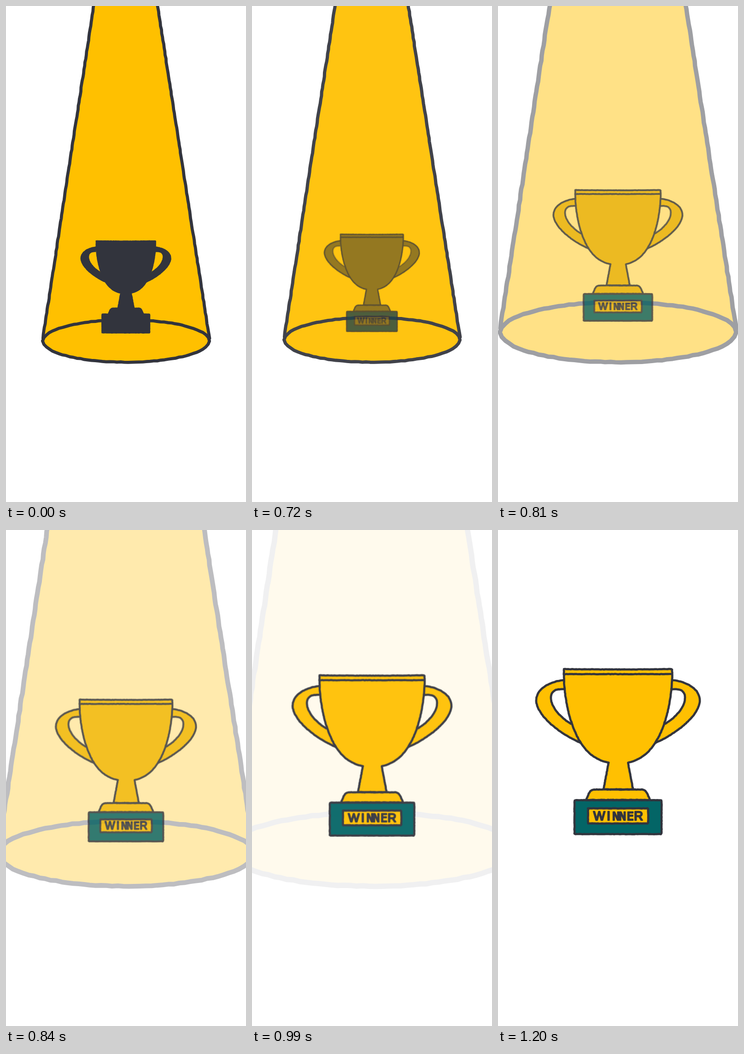
Write an HTML page that moves like this. It is 521 px wide and 1075 px high and loops after 1.23 s.

```html
<!DOCTYPE html>
<html lang="en">
<head>
<meta charset="utf-8">
<title>Trophy reveal</title>
<style>
  html, body { margin: 0; width: 100%; height: 100%; overflow: hidden; background: #fff; }
  svg { display: block; width: 100%; height: 100%; }
  path { stroke-linecap: round; stroke-linejoin: round; }
  text { font: 27px "Liberation Sans", Arial, sans-serif; }
  .narrow { font: 26px "Noto Sans Mono", monospace; }
</style>
</head>
<body>
<svg id="stage" viewBox="0 0 521 1075" xmlns="http://www.w3.org/2000/svg">
  <g id="spot"></g>
  <g id="shade"></g>
  <g id="trophy"></g>
</svg>
<script>
const INK = '#32343d', GOLD = '#ffc000', TEAL = '#036566';
const LOOP = 1230, STEP = 30, START = 602, LENGTH = 610;
const CENTER = 260.5, FLOOR = 772;
const byId = id => document.getElementById(id);
const spot = byId('spot'), shade = byId('shade'), trophy = byId('trophy');

let seed = 7;
const random = () => (seed = seed * 16807 % 2147483647) / 2147483647;

function add(parent, tag, attrs) {
  const el = document.createElementNS('http://www.w3.org/2000/svg', tag);
  for (const key in attrs) el.setAttribute(key, attrs[key]);
  return parent.appendChild(el);
}

// Resamples a path with small random offsets for a hand-drawn edge.
function rough(d, gap, amount) {
  const probe = document.createElementNS('http://www.w3.org/2000/svg', 'path');
  probe.setAttribute('d', d);
  const total = probe.getTotalLength();
  const count = Math.ceil(total / gap);
  const points = [];
  for (let i = 0; i <= count; i++) {
    const q = probe.getPointAtLength(total * i / count);
    const x = q.x + (random() * 2 - 1) * amount;
    const y = q.y + (random() * 2 - 1) * amount;
    points.push(x.toFixed(2) + ' ' + y.toFixed(2));
  }
  return 'M' + points.join('L') + (/z$/i.test(d) ? 'Z' : '');
}

function draw(parent, d, fill, stroke, width, gap = 3, amount = 0.35) {
  add(parent, 'path', { d: rough(d, gap, amount), fill, stroke, 'stroke-width': width });
}

const outer = 'M143 325C110 329 83 345 83 369C83 400 130 440 181 462';
const inner = 'M143 345H133C121 346 115 353 115 363C115 385 137 407 158 420';
const handle = outer + 'L158 420C137 407 115 385 115 363C115 353 121 346 133 345H143Z';
const cup = 'M143 301.3Q260.5 303 378 301.3V318C377 360 368 415 345 455C328 485 305 500 282 504' +
  'L293 562H229L240 504C216 500 193 485 176 455C153 415 144 360 143 318Z';
const dome = 'M191 585C197 573 198 562 211 562.5H311C323 562 324 573 330 585Z';
const base = 'M169 585.5H353Q355 585.5 355 588V659H166V588Q166 585.5 169 585.5Z';

function buildSpot() {
  draw(spot, 'M191 -4L80 722A181 46 0 0 0 442 726L328.5 -4Z', GOLD, 'none', 0);
  const line = d => draw(spot, d, 'none', INK, 6.7, 8, 0.5);
  line('M191 -4L80 720');
  line('M328.5 -4L441.5 720');
  line('M79.7 726A181 46 0 0 1 441.7 726A181 46 0 0 1 79.7 726Z');
}

function buildTrophy(parent, solid) {
  const gold = solid ? INK : GOLD;
  const width = solid ? 4.2 : 4.7;
  for (const flip of ['', 'translate(521 0) scale(-1 1)']) {
    const side = add(parent, 'g', { transform: flip });
    draw(side, handle, gold, 'none', 0);
    draw(side, outer, 'none', INK, width);
    if (!solid) draw(side, inner, 'none', INK, width);
  }
  draw(parent, cup, gold, INK, width);
  draw(parent, dome, gold, INK, width);
  draw(parent, base, solid ? INK : TEAL, INK, width);
  if (solid) return;
  draw(parent, 'M143 312.3H378', 'none', INK, width);
  draw(parent, 'M195.5 603.3H326V636H195.5Z', GOLD, INK, width);
  buildLabel(parent);
}

function buildLabel(parent) {
  const label = add(parent, 'text', {
    y: 628.6, fill: INK, stroke: INK, 'stroke-width': 2.7, 'stroke-linejoin': 'round'
  });
  const part = (text, x, style) =>
    add(label, 'tspan', { x, class: style }).textContent = text;
  part('WI', '207 236.2', 'wide');
  part('NNE', '248.2 262.2 279.5', 'narrow');
  part('R', '295.2', 'wide');
}

// Cubic bezier easing with control points (lead, 0) and (0, 1).
function ease(x, lead) {
  if (x <= 0) return 0;
  if (x >= 1) return 1;
  let lo = 0, hi = 1;
  for (let i = 0; i < 30; i++) {
    const s = (lo + hi) / 2;
    if (3 * s * (1 - s) ** 2 * lead + s ** 3 < x) lo = s; else hi = s;
  }
  return lo * lo * (3 - 2 * lo);
}

const mix = (a, b, p) => a + (b - a) * p;

function render(time) {
  const t = Math.floor(time % LOOP / STEP) * STEP;
  const x = (t - START) / LENGTH;
  const move = ease(x, 0.557), fade = ease(x, 0.34);

  const zoom = mix(1, 1.785, move);
  spot.setAttribute('transform',
    `translate(${CENTER} ${FLOOR}) scale(${zoom}) translate(${-CENTER} ${-FLOOR})`);
  spot.setAttribute('opacity', 1 - move);

  const pose = `translate(${mix(260.2, CENTER, move)} ${mix(508, 299.5, move)}) ` +
    `scale(${mix(0.549, 1, move)} ${mix(0.558, 1, move)}) translate(${-CENTER} -299.5)`;
  shade.setAttribute('transform', pose);
  trophy.setAttribute('transform', pose);
  shade.setAttribute('opacity', 1 - fade);
  trophy.setAttribute('opacity', fade);
}

buildSpot();
buildTrophy(shade, true);
buildTrophy(trophy, false);

let origin = null;
function tick(now) {
  if (origin === null) origin = now;
  render(now - origin);
  requestAnimationFrame(tick);
}
render(0);
requestAnimationFrame(tick);
</script>
</body>
</html>
```
